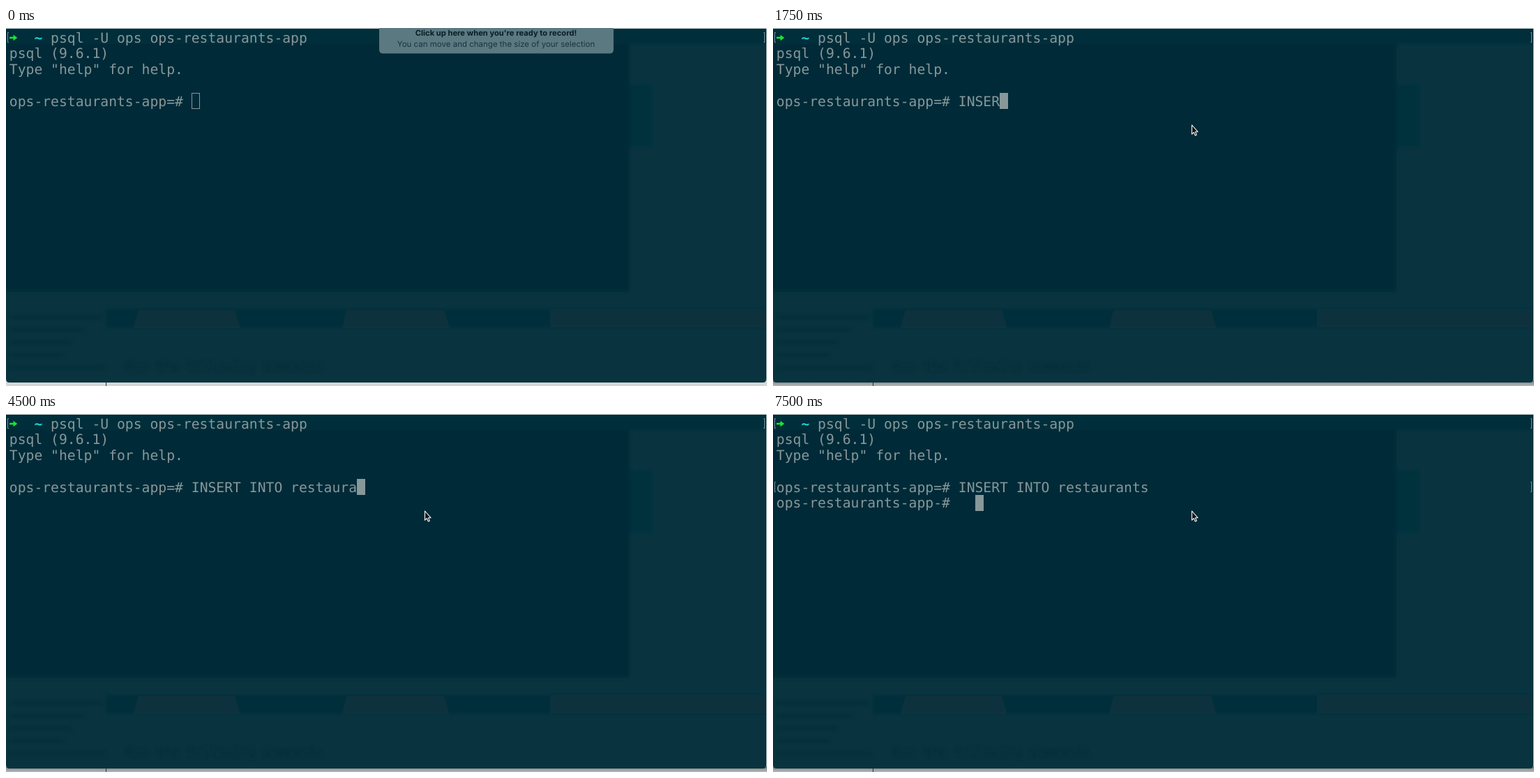
An HTML page that plays this animation: 1091x513 px, repeating every 8000 ms.

```html
<!DOCTYPE html>
<html lang="en">
<head>
<meta charset="utf-8">
<title>psql session</title>
<style>
  html, body { margin: 0; width: 100%; height: 100%; overflow: hidden; background: #d4d8d8; }
  svg { display: block; width: 1091px; height: 513px; }
  text { white-space: pre; text-rendering: geometricPrecision; }
  .term text { font: 19.72px "DejaVu Sans Mono", monospace; fill: #869899; }
  .marks path { fill: none; stroke: #7193a0; stroke-width: 1; }
  .banner text { font: 11.5px Inter, sans-serif; text-anchor: middle; fill: #1b343b; }
  .banner .title { font-size: 11.2px; font-weight: 700; fill: #0b1e24; }
  .ghost text { font: 18px "DejaVu Sans Mono", monospace; fill: #022a35; }
</style>
</head>
<body>
<svg viewBox="0 0 1091 513">
  <defs>
    <linearGradient id="shade" x1="0" y1="0" x2="0" y2="1">
      <stop offset="0" stop-color="#777d7e"/>
      <stop offset="1" stop-color="#b4b8b8"/>
    </linearGradient>
    <filter id="soft" x="-10%" y="-30%" width="120%" height="160%"><feGaussianBlur stdDeviation="2.5"/></filter>
    <filter id="smear" x="-10%" y="-50%" width="120%" height="200%"><feGaussianBlur stdDeviation="2"/></filter>
    <clipPath id="frame"><path d="M0 1H1090V503Q1090 508 1085 508H5Q0 508 0 503Z"/></clipPath>
  </defs>

  <rect width="1091" height="513" fill="#d4d8d8"/>
  <rect id="shadow" y="505" width="1091" height="8" fill="url(#shade)"/>
  <path d="M143.5 508V513" stroke="#333"/>

  <g clip-path="url(#frame)">
    <rect width="1091" height="513" fill="#09343f"/>
    <g filter="url(#soft)">
      <rect x="880" y="80" width="47" height="91" fill="#06313d"/>
      <rect x="-10" y="22" width="904" height="356" fill="#012c37"/>
      <rect x="-10" y="-10" width="1110" height="33" fill="#052f3a"/>
      <rect x="143" y="402" width="960" height="28" fill="#052f3a"/>
      <path d="M182 430L190 404H328L336 430ZM482 430L488 404H628L636 430Z" fill="#08333e"/>
      <rect x="780" y="403" width="320" height="26" fill="#07313c"/>
    </g>
    <g class="ghost" filter="url(#smear)">
      <text x="172" y="491" opacity=".6">Run the following commands</text>
      <g id="lines" fill="#052f3a"></g>
    </g>
  </g>

  <g class="marks">
    <path d="M4 6.500H2.500V20.500H4M1086 6.500H1087.500V20.500H1086"/>
    <path id="mark" d="M4 97.500H2.500V111.500H4M1086 97.500H1087.500V111.500H1086"/>
  </g>

  <g class="term">
    <path d="M5 12.800H10.500V9.800L16.300 14L10.500 18.200V15.200H5Z" fill="#18e632"/>
    <text x="40.400" y="20.500" style="fill:#1fd5dc;font-weight:700">~</text>
    <text x="64.100" y="20.500">psql -U ops ops-restaurants-app</text>
    <text x="4.800" y="43.250">psql (9.6.1)</text>
    <text x="4.800" y="66">Type "help" for help.</text>
    <text id="first" x="4.800" y="111.500"></text>
    <text id="second" x="4.800" y="134.250">ops-restaurants-app-# </text>
    <rect id="cursor" stroke="#869899"/>
  </g>

  <g class="banner" id="banner">
    <path d="M535 0H871V31Q871 36.500 865.500 36.500H540.500Q535 36.500 535 31Z" fill="#5b7981"/>
    <text class="title" x="702.500" y="11">Click up here when you're ready to record!</text>
    <text x="702.500" y="26.500">You can move and change the size of your selection</text>
  </g>

  <path id="pointer" d="M600.500 139V152.200L603.400 149.500L605.300 154L607.400 153.100L605.500 148.700H609Z"
        fill="#10191c" stroke="#f4f6f6" stroke-width="1.100" stroke-linejoin="round"/>
</svg>
<script>
  const LOOP = 8000, CELL = 11.872, LEFT = 4.8, ROW = 22.75;
  const PROMPT = "ops-restaurants-app=# ";
  const QUERY = "INSERT INTO restaurants";
  const RECORD = 250, FOCUS = 500, ENTER = 6500, INDENT = 7500;

  // [ms, characters typed]
  const TYPING = [
    [0, 0], [1250, 1], [1500, 3], [1750, 5], [2000, 6], [2250, 7], [2500, 9], [2750, 10],
    [3000, 12], [3750, 14], [4000, 16], [4250, 17], [4500, 20], [4750, 22], [5250, 23]
  ];

  const el = id => document.getElementById(id);
  const show = (id, on) => el(id).setAttribute("visibility", on ? "visible" : "hidden");
  const set = (node, attrs) => {
    for (const key in attrs) node.setAttribute(key, attrs[key]);
  };

  // Faint sidebar lines seen through the translucent window
  for (let i = 0; i < 5; i++) {
    const line = document.createElementNS("http://www.w3.org/2000/svg", "rect");
    set(line, { x: 4, y: 412 + i * 18, width: [134, 108, 90, 78, 138][i], height: 5, opacity: 0.7 });
    el("lines").append(line);
  }

  function placeCursor(column, row, solid) {
    const inset = solid ? 0 : 0.5;
    set(el("cursor"), {
      x: Math.round(LEFT + column * CELL) + inset,
      y: Math.round(2 + row * ROW) + inset,
      width: 12 - 2 * inset,
      height: 23 - 2 * inset,
      fill: solid ? "#869899" : "none",
      "stroke-width": solid ? 0 : 1
    });
  }

  function draw(t) {
    const typed = TYPING.filter(step => step[0] <= t).pop()[1];
    const entered = t >= ENTER;
    el("first").textContent = PROMPT + QUERY.slice(0, typed);
    show("second", entered);
    show("mark", entered);
    show("banner", t < RECORD);
    show("pointer", t >= RECORD);
    show("shadow", t >= FOCUS);
    const column = PROMPT.length + (entered ? (t >= INDENT ? 2 : 0) : typed);
    placeCursor(column, entered ? 5 : 4, t >= FOCUS);
  }

  const start = performance.now();
  function tick() {
    draw((performance.now() - start) % LOOP);
    requestAnimationFrame(tick);
  }
  tick();
</script>
</body>
</html>
```
